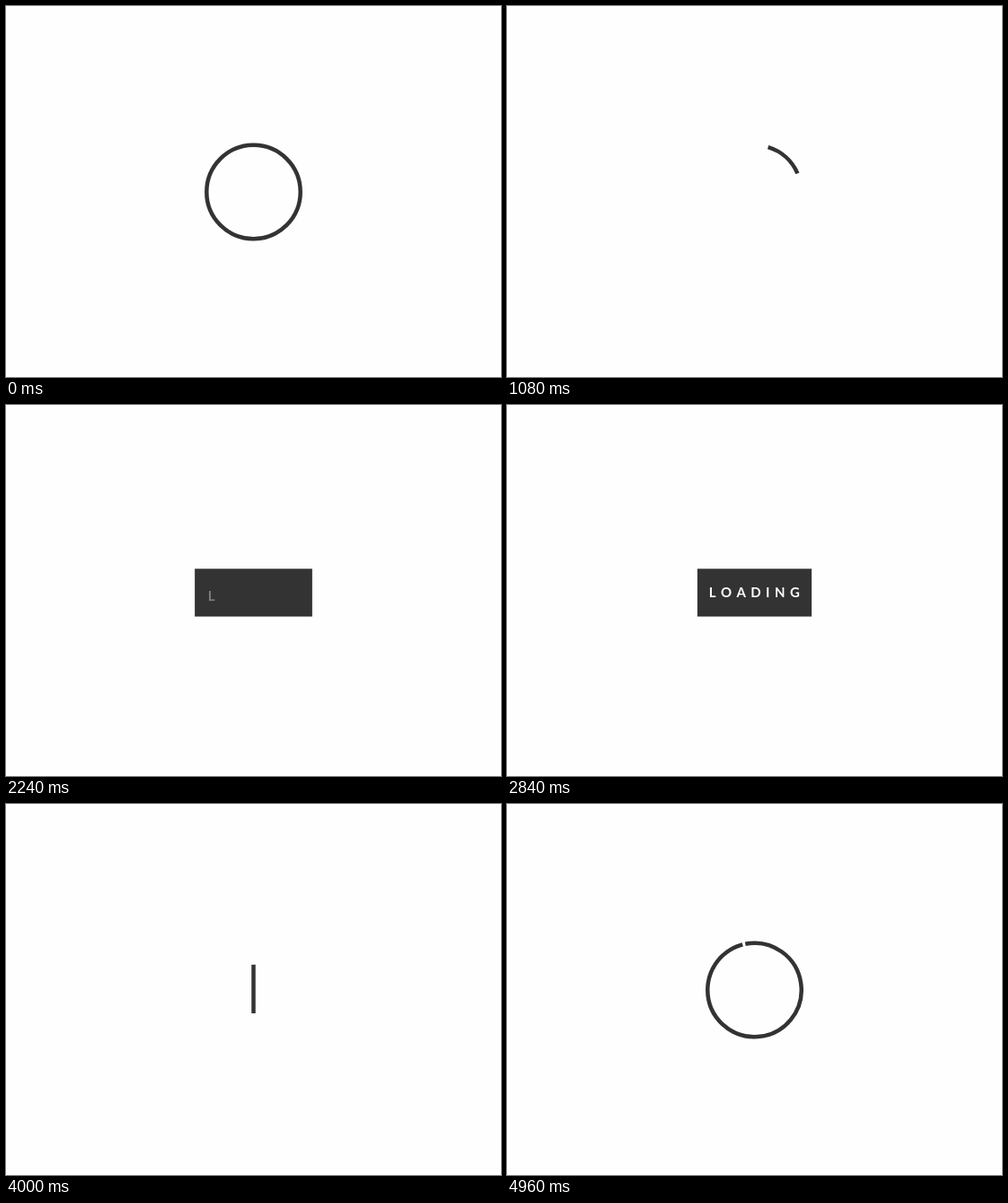
An HTML page for the animation above (5000 ms loop, 551 by 413 pixels).

```html
<!DOCTYPE html>
<html lang="en">
<head>
<meta charset="utf-8">
<title>Loading</title>
<style>
  html, body { margin: 0; width: 100%; height: 100%; overflow: hidden; background: #fefefe; }
  svg { display: block; width: 551px; height: 413px; }
  text { font: 700 15px Lato, sans-serif; letter-spacing: 5.4px; fill: #fff; }
</style>
</head>
<body>
<svg viewBox="0 0 551 413">
  <clipPath id="boxClip"><rect id="clip" y="182.3" height="53.2"/></clipPath>
  <g transform="translate(275.5 207)">
    <path id="stroke" fill="none" stroke="#333" stroke-width="4.5"/>
  </g>
  <g id="box">
    <rect id="plate" y="182.3" height="53.2" fill="#333"/>
    <g clip-path="url(#boxClip)"><text id="label" x="224.7" y="213.8"></text></g>
  </g>
</svg>
<script>
const LOOP = 5000, STEP = 40;
const R = 52.2, TURN = 2 * Math.PI * R;
const LINE = 54, THIN = 4.5, WIDE = 127.2;
const HEAD_STOP = -11.3, TAIL_STOP = -14.7;

const el = id => document.getElementById(id);
const stroke = el('stroke'), box = el('box'), plate = el('plate'), clip = el('clip'), label = el('label');

const mix = (a, b, k) => a + (b - a) * k;
const span = (t, from, to) => Math.min(1, Math.max(0, (t - from) / (to - from)));
const outQuad = p => 1 - (1 - p) ** 2;
const inOut = (p, n) => p < 0.5 ? (2 * p) ** n / 2 : 1 - (2 - 2 * p) ** n / 2;
const inBack = (p, s) => (s + 1) * p ** 3 - s * p ** 2;
const outBack = (p, s) => 1 - inBack(1 - p, s);
const glide = (p, n) => (1 - (1 - p) ** 2.5) ** n;

// Angles run clockwise from the top, in degrees.
const onRing = deg => {
  const a = deg * Math.PI / 180;
  return { x: R * Math.sin(a), y: -R * Math.cos(a) };
};
const xy = p => `${p.x.toFixed(2)} ${p.y.toFixed(2)}`;
const arc = (large, sweep, p) => `A${R} ${R} 0 ${large} ${sweep} ${xy(p)}`;

const lap = arc(0, 1, onRing(180)) + arc(0, 1, onRing(360));
const ringPath = `M0 ${-R}${lap}Z`;
const inPath = `M0 ${-R}${lap}${lap}${arc(0, 1, onRing(90))}C${R} 52 0 58 0 27V-25`;
const outPath = `M0 29V-27C0 -58 ${-R} -52 ${-R} 0${arc(1, 0, onRing(HEAD_STOP))}`;

const measure = d => {
  stroke.setAttribute('d', d);
  return stroke.getTotalLength();
};
const inLength = measure(inPath), outLength = measure(outPath);

// The inner hook of the outgoing path, from its tail to where it meets the ring.
const HOOK_TAIL = 90, HOOK_STEPS = 30;
const hookEnd = outLength - TURN * (270 + HEAD_STOP * -1) / 360;
const hook = Array.from({ length: HOOK_STEPS + 1 }, (_, i) => {
  const k = i / HOOK_STEPS;
  return {
    from: stroke.getPointAtLength(mix(HOOK_TAIL, hookEnd, k)),
    to: onRing(mix(TAIL_STOP, -90, k))
  };
});

function openHook(k) {
  const points = hook.map(h => xy({ x: mix(h.from.x, h.to.x, k), y: mix(h.from.y, h.to.y, k) }));
  return `M${points.join('L')}${arc(1, 0, onRing(HEAD_STOP))}`;
}

const letters = [...'LOADING'].map(char => {
  const node = document.createElementNS('http://www.w3.org/2000/svg', 'tspan');
  node.textContent = char;
  label.append(node);
  return node;
});

function drawStroke(d, tail, head) {
  stroke.setAttribute('d', d);
  if (head === undefined) stroke.removeAttribute('stroke-dasharray');
  else stroke.setAttribute('stroke-dasharray', `0 ${tail} ${head - tail} 9999`);
}

function drawLine(t) {
  if (t < 120) return drawStroke(ringPath);
  if (t < 3880) {
    const p = span(t, 80, 1760);
    return drawStroke(inPath, mix(0, inLength - LINE, glide(p, 1.93)), mix(TURN, inLength, glide(p, 3.26)));
  }
  if (t <= 4800) {
    const p = span(t, 3880, 4800);
    return drawStroke(outPath, HOOK_TAIL * inOut(p, 2), mix(LINE, outLength, inOut(p, 3)));
  }
  drawStroke(openHook(outQuad(span(t, 4800, 4960))));
}

function drawBox(t) {
  const visible = t > 1760 && t < 3920;
  box.style.display = visible ? '' : 'none';
  stroke.style.display = visible ? 'none' : '';
  if (!visible) return;

  const open = outBack(span(t, 1760, 2360), 1.15) - inBack(span(t, 3680, 3920), 0.65);
  const width = mix(THIN, WIDE, open);
  for (const r of [plate, clip]) {
    r.setAttribute('x', 275.5 - width / 2);
    r.setAttribute('width', width);
  }
  label.setAttribute('opacity', 1 - span(t, 3680, 3800));
  letters.forEach((node, i) => {
    const start = 2180 + 60 * i;
    const k = outQuad(span(t, start, start + 300));
    node.setAttribute('fill-opacity', k);
    node.setAttribute('y', 213.8 + 6 * (1 - k));
  });
}

function render(now) {
  const t = Math.floor((now % LOOP) / STEP) * STEP;
  drawLine(t);
  drawBox(t);
}

const begin = performance.now();
function tick() {
  render(performance.now() - begin);
  requestAnimationFrame(tick);
}
tick();
</script>
</body>
</html>
```
